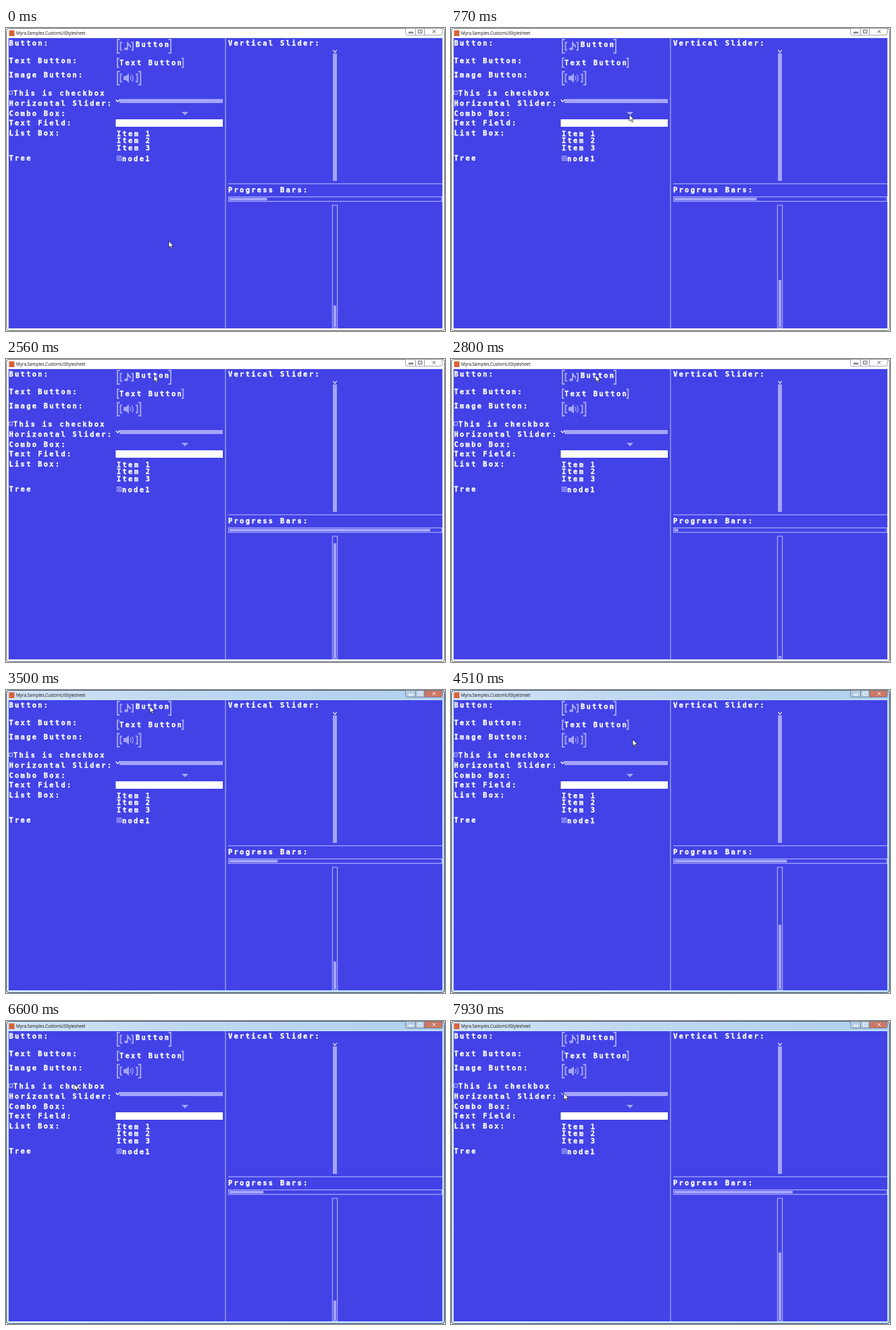
Animation of 650x448 px, one loop 7990 ms. Source, as an HTML page:

```html
<!DOCTYPE html>
<html lang="en">
<head>
<meta charset="utf-8">
<title>Widget window</title>
<style>
  html, body { margin: 0; width: 100%; height: 100%; overflow: hidden; background: #fff; }
  svg { display: block; width: 650px; height: 448px; }
  .label { font: bold 10.4px "DejaVu Sans Mono", monospace; letter-spacing: 2.29px; fill: #fff; stroke: #fff; stroke-width: .35; white-space: pre; }
  .title { font: 6.35px "Open Sans", sans-serif; fill: #111; }
  .lilac { fill: #a5a5ff; }
  .line { fill: none; stroke: #a5a5ff; stroke-width: 1.3; }
  .thick { stroke-width: 1.9; }
  .mark { fill: none; stroke: #fff; stroke-width: 1.2; }
  .chrome { fill: #fff; stroke: #8a919b; stroke-width: .8; }
  .sign { fill: none; stroke: #555c66; stroke-width: 1; }
  .active .frame { fill: url(#glass); stroke: #46566a; }
  .active .edge { stroke: #c9ebfa; }
  .active .chrome { fill: #b7cce2; stroke: #62778d; }
  .active .close { fill: #cd7866; }
  .active .sign { stroke: #f6fafd; }
</style>
</head>
<body>
<svg id="win" viewBox="0 0 650 448">
  <defs>
    <linearGradient id="glass">
      <stop offset="0" stop-color="#d3e4f5"/>
      <stop offset=".4" stop-color="#bfd8f1"/>
      <stop offset="1" stop-color="#b0d0ee"/>
    </linearGradient>
  </defs>

  <rect class="frame" x=".5" y=".5" width="649" height="447" rx="4" fill="#fff" stroke="#6d7278"/>
  <rect class="edge" x="3.5" y="14.5" width="643" height="430" fill="none" stroke="#e4e8ee"/>
  <rect x="4" y="15" width="642" height="429" fill="#4242e7"/>
  <rect x="4.5" y="3.5" width="8" height="8.5" fill="#d8623a"/>
  <text class="title" x="15" y="10.3">Myra.Samples.CustomUIStylesheet</text>

  <path class="chrome" d="M591.5 .5H606.5V10.5H593.5Q591.5 10.5 591.5 8.5Z"/>
  <path class="chrome" d="M606.5 .5H619.5V10.5H606.5Z"/>
  <path class="chrome close" d="M619.5 .5H646V8.5Q646 10.5 644 10.5H619.5Z"/>
  <path class="sign" d="M596.5 6H602.5V7.5H596.5ZM610.5 3H616V7.5H610.5ZM612.5 5H614M631.5 3L636 7.5M636 3L631.5 7.5"/>

  <g id="labels"></g>

  <path class="line" d="M325 15V444M329 230.4H646"/>
  <path id="brackets" class="line thick"/>
  <g class="lilac">
    <path d="M179 20.5H180.8Q181.5 23.5 184 25Q186.4 27.2 184.2 30.5Q184.6 27.2 180.8 26V31H179Z"/>
    <ellipse cx="178" cy="30.8" rx="2.9" ry="2"/>
    <path d="M174 71H177.5L182 67V81L177.5 77H174Z"/>
    <path d="M260 124H270L265 129Z"/>
    <rect x="168" y="105" width="153" height="6"/>
    <rect x="484" y="37.5" width="6" height="188.5"/>
  </g>
  <path class="line" d="M183.8 71Q186.2 74 183.8 77M186.3 68.8Q190.3 74 186.3 79.2"/>
  <rect class="line" x="4.7" y="93.2" width="4.8" height="4.8"/>
  <rect id="check" class="lilac" x="6" y="94.4" width="2.4" height="2.4"/>
  <path id="handle" class="mark" d="M162.7 106L165.3 109L167.9 106"/>
  <path class="mark" d="M484.3 32.5L487 36L489.7 32.5"/>
  <rect x="162.5" y="135" width="158.5" height="11" fill="#fff"/>
  <path class="line" d="M164.5 189.5H170.5V195.5H164.5Z"/>
  <path class="line" stroke-width="1" d="M166 192.5H169M167.5 191V194"/>

  <path class="line" d="M329.6 249.6H645.4V256.4H329.6ZM483.4 262.2H490.6V443.4H483.4Z"/>
  <rect id="across" class="lilac" x="331" y="251" height="4"/>
  <rect id="up" class="lilac" x="485" width="4"/>

  <path id="cursor" d="M0 0V9.6L2.2 7.6L3.9 11.2L5.4 10.5L3.8 7H6.9Z" fill="#fff" stroke="#111" stroke-width=".7"/>
</svg>
<script>
const $ = id => document.getElementById(id);

const labels = [
  [4.5, 25.5, "Button:"], [192, 28, "Button"],
  [4.5, 52, "Text Button:"], [168, 55, "Text Button"],
  [4.5, 73, "Image Button:"], [11, 99.5, "This is checkbox"],
  [4.5, 114.5, "Horizontal Slider:"], [4.5, 129.5, "Combo Box:"],
  [4.5, 144, "Text Field:"], [4.5, 159, "List Box:"],
  [164, 159.5, "Item 1"], [164, 170, "Item 2"], [164, 180.5, "Item 3"],
  [4.5, 195.5, "Tree"], [172, 196.8, "node1"],
  [329, 25.5, "Vertical Slider:"], [329, 243, "Progress Bars:"]
];
$("labels").innerHTML = labels.map(([x, y, s]) =>
  `<text class="label" x="${x}" y="${y}">${s}</text>`).join("");

// A facing pair of square brackets: left, top, right, bottom, lip
const pair = (l, t, r, b, lip) =>
  `M${l + lip} ${t}H${l}V${b}H${l + lip}M${r - lip} ${t}H${r}V${b}H${r - lip}`;
$("brackets").setAttribute("d",
  pair(165, 17, 244, 37, 3.5) + pair(169.5, 21.5, 188, 32.5, 2.5) +
  pair(165, 44.8, 262.3, 58, 2.5) +
  pair(165, 64.5, 199.3, 84, 3.5) + pair(169.5, 68.5, 194.5, 79.5, 2.5));

const LOOP = 7990, TICKS = 103, STEP = LOOP / TICKS;
const CYCLE = 3325, START = 0.177;

// Pointer path: time, x, y
const path = [
  [0, 241, 315], [150, 243, 312], [800, 268, 94], [940, 258, 90],
  [1550, 109, 244], [1700, 71, 226], [1860, 76, 210], [2400, 217, 28],
  [2560, 219, 24], [2800, 214, 24], [3500, 213, 24], [3800, 178, 25],
  [4120, 224, 28], [4510, 270, 74], [4970, 157, 96], [5300, 106, 95],
  [5820, 101, 94], [5980, 99, 93], [6270, 99, 93], [6600, 101, 93],
  [6750, 104, 94], [7070, 172, 107], [7400, 168, 108], [7930, 167, 107], [LOOP, 167, 107]
];

function pointAt(t) {
  const i = Math.max(1, path.findIndex(k => k[0] >= t));
  const [t0, x0, y0] = path[i - 1], [t1, x1, y1] = path[i];
  const k = (t - t0) / (t1 - t0);
  return [x0 + (x1 - x0) * k, y0 + (y1 - y0) * k];
}

function draw(now) {
  const tick = Math.min(TICKS - 1, Math.floor((now % LOOP + 4) / STEP));
  const t = tick * STEP;
  const value = (START + t / CYCLE) % 1;
  $("across").setAttribute("width", value * 314);
  $("up").setAttribute("y", 442 - value * 179);
  $("up").setAttribute("height", value * 179);
  $("cursor").setAttribute("transform", `translate(${pointAt(t).map(Math.round)})`);
  $("win").classList.toggle("active", t > 2800);
  $("check").style.display = t > 5600 && t < 6450 ? "" : "none";
  $("handle").style.stroke = t > 7400 ? "#a5a5ff" : "#fff";
  requestAnimationFrame(draw);
}
requestAnimationFrame(draw);
</script>
</body>
</html>
```
